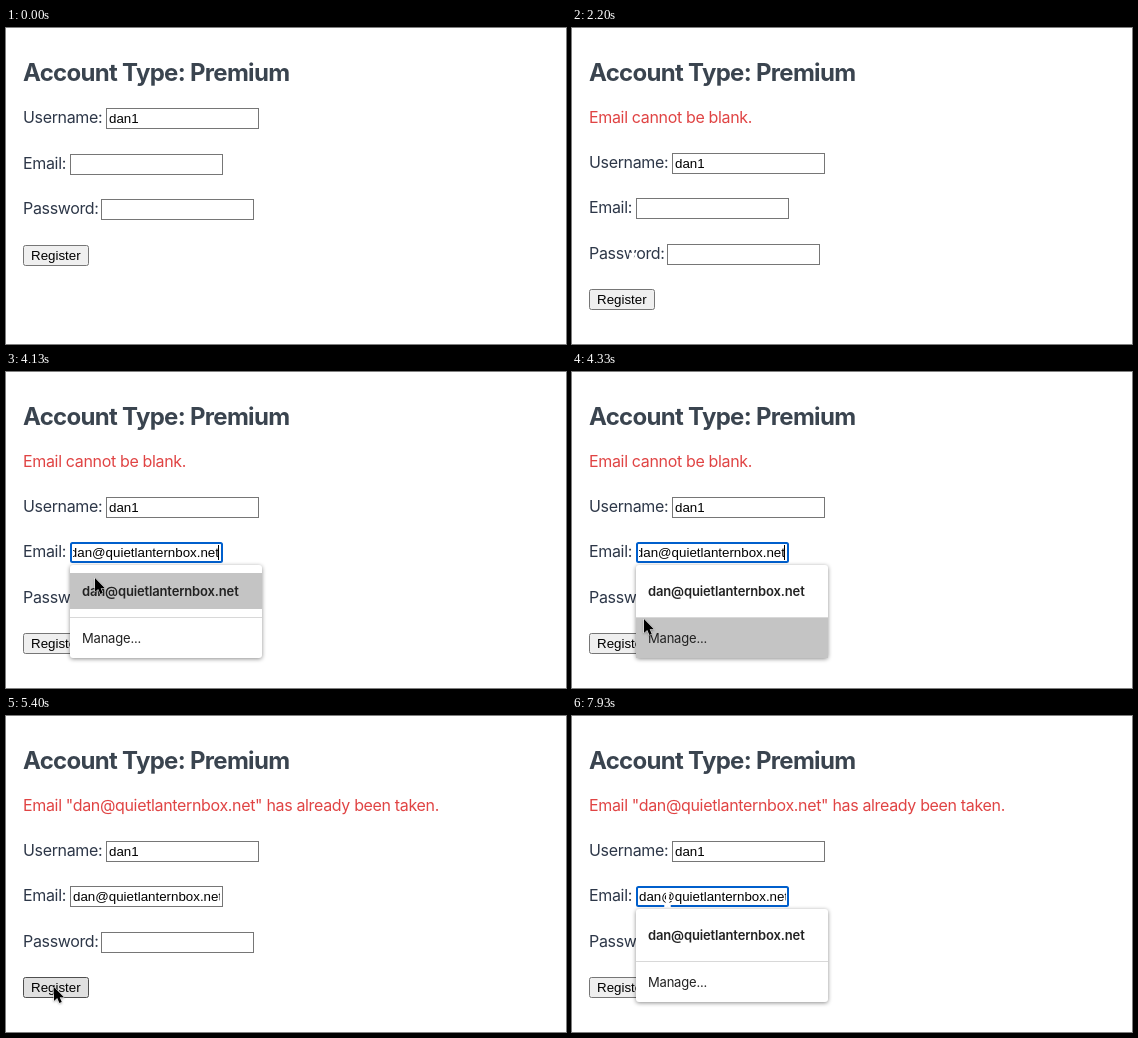
These frames come from a looping animation (560x316 px, 8 s). An HTML page:

```html
<!DOCTYPE html>
<html lang="en">
<head>
<meta charset="utf-8">
<style>
  html, body { margin: 0; width: 100%; height: 100%; overflow: hidden; background: #fff; }
  svg { display: block; }
  text { white-space: pre; }
  .copy { font: 16px Inter, sans-serif; letter-spacing: -.34px; fill: #2d3748; }
  .title { font: 700 24px Inter, sans-serif; letter-spacing: -.7px; fill: #3a444f; }
  #error { fill: #e04444; }
  .control { font: 13.333px "Liberation Sans", Arial, sans-serif; }
  .box { fill: #fff; stroke: #767676; }
  .box.hover { stroke: #4f4f4f; }
  .box.focus { stroke: #005fcc; stroke-width: 2; }
  #button { fill: #efefef; stroke: #767676; }
  #button.hover { fill: #e0e0e0; stroke: #4f4f4f; }
  #button.active { fill: #f5f5f5; stroke: #8d8d8d; }
  #popup { font: 13px Inter, sans-serif; letter-spacing: -.2px; fill: #222; }
  .item { font-weight: 600; letter-spacing: -.15px; }
  #panel { fill: #fff; filter: drop-shadow(0 1px 2px rgba(0, 0, 0, .45)); }
  #highlight { fill: #c4c4c4; }
</style>
</head>
<body>
<svg width="560" height="316" viewBox="0 0 560 316">
  <clipPath id="field"><rect x="67" y="0" width="147" height="21"/></clipPath>
  <text class="title" x="17" y="53">Account Type: Premium</text>
  <text class="copy" id="error" x="17" y="95"></text>
  <g class="row">
    <text class="copy" x="17" y="15">Username:</text>
    <rect class="box" x="100.5" y=".5" width="152" height="20"/>
    <text class="control" x="103" y="15">dan1</text>
  </g>
  <g class="row">
    <text class="copy" x="17" y="15">Email:</text>
    <rect class="box" id="emailBox" x="64.5" y=".5" width="152" height="20"/>
    <g clip-path="url(#field)"><text class="control" id="email" x="67" y="15">dan@quietlanternbox.net</text></g>
    <rect id="caret" y="3" width="1" height="15"/>
  </g>
  <g class="row">
    <text class="copy" x="17" y="15">Password:</text>
    <rect class="box" x="95.5" y=".5" width="152" height="20"/>
  </g>
  <g class="row">
    <rect id="button" x="17.5" y=".5" width="65" height="20" rx="2"/>
    <text class="control" x="25" y="15">Register</text>
  </g>
  <g id="popup">
    <rect id="panel" x="64" y="193" width="192" rx="3"/>
    <rect id="highlight" x="64" width="192"/>
    <text class="item" x="76" y="224">dan@quietlanternbox.net</text>
    <text class="item" id="second" x="76" y="260">info@quietlanternbox.net</text>
    <g id="footer">
      <rect x="64" y="245" width="192" height="1" fill="#d8d8d8"/>
      <text x="76" y="271">Manage...</text>
    </g>
  </g>
  <g id="cursor" stroke-linejoin="round">
    <path id="arrow" d="M0 0V14L3.2 11.1 5.4 16 7.8 15 5.7 10.2H10Z" stroke="#fff" paint-order="stroke"
      style="filter: drop-shadow(0 1px 1px rgba(0, 0, 0, .3))"/>
    <g id="beam" fill="none">
      <path id="beamShape" d="M-3-7.5Q0-7.5 0-5.5Q0-7.5 3-7.5M0-5.5V5.5M-3 7.5Q0 7.5 0 5.5Q0 7.5 3 7.5M-2 2.5H2" stroke="#fff" stroke-width="2.6"/>
      <use href="#beamShape" style="stroke: #000; stroke-width: 1"/>
    </g>
  </g>
</svg>
<script>
const $ = id => document.getElementById(id);
const rows = [...document.querySelectorAll('.row')];
const boxes = [...document.querySelectorAll('.box')];
const LOOP = 8000, STEP = 200 / 3;
const TOPS = [80, 126, 171, 217], SHIFTED = [125, 170, 216, 261];
const FIELD_X = [100, 64, 95];

// pointer path: time, x, y
const PATH = [
  [730, 304, 90], [870, 150, 185], [1000, 45, 248], [1070, 16, 261], [1130, 17, 257], [1330, 60, 233],
  [2333, 60, 233], [2600, 101, 171], [2800, 101, 178],
  [4000, 101, 178], [4333, 72, 247], [4600, 48, 271],
  [5800, 48, 271], [6130, 76, 214], [6400, 96, 183],
  [7733, 96, 183], [7800, 97, 181], [7930, 95, 182]
];

const show = (el, on) => el.style.display = on ? '' : 'none';
const within = (t, ...spans) => spans.some(([a, b]) => t >= a && t < b);

function pointer(t) {
  const next = PATH.findIndex(p => p[0] > t);
  if (next < 0) return PATH.at(-1).slice(1);
  if (!next) return PATH[0].slice(1);
  const [a, b] = [PATH[next - 1], PATH[next]];
  const k = (t - a[0]) / (b[0] - a[0]);
  return [1, 2].map(i => Math.round(a[i] + (b[i] - a[i]) * k));
}

function draw(t) {
  const [x, y] = pointer(Math.floor((t + 5) / STEP) * STEP);
  const visible = t >= 730 && !within(t, [3800, 4070]);
  const tops = t < 2200 ? TOPS : SHIFTED;
  const focus = within(t, [3270, 4800], [6870, LOOP]);
  const open = within(t, [3270, 4800], [7000, LOOP]);
  const extra = within(t, [3270, 3870]) ? 36 : 0;
  const bottom = 286 + extra;
  const inPopup = open && visible && x >= 64 && x < 256 && y >= 193 && y < bottom;
  const over = visible && !inPopup ? tops.findIndex(top => y >= top && y < top + 21) : -1;

  rows.forEach((row, i) => row.setAttribute('transform', `translate(0 ${tops[i]})`));
  boxes.forEach((box, i) => {
    const hover = over === i && x >= FIELD_X[i] && x < FIELD_X[i] + 153;
    box.classList.toggle('hover', hover);
  });

  const inset = focus ? 1 : .5;
  const size = { x: 64 + inset, y: inset, width: 153 - 2 * inset, height: 21 - 2 * inset, rx: focus ? 1.5 : 0 };
  for (const key in size) $('emailBox').setAttribute(key, size[key]);
  $('emailBox').classList.toggle('focus', focus);

  $('error').textContent = t < 2200 ? '' : t < 5400 ? 'Email cannot be blank.'
    : 'Email "dan@quietlanternbox.net" has already been taken.';

  // while editing, the field is scrolled to the end of its text
  const scrolled = within(t, [3800, 4800]);
  show($('email'), t >= 3800);
  $('email').setAttribute('x', scrolled ? 213 : 67);
  $('email').setAttribute('text-anchor', scrolled ? 'end' : 'start');
  show($('caret'), within(t, [3270, 4400], [6870, 7530]));
  $('caret').setAttribute('x', t < 3800 ? 68 : scrolled ? 212 : 90);

  const active = within(t, [1600, 1800], [4930, 5000]);
  const onButton = over === 3 && x >= 17 && x < 83;
  $('button').setAttribute('class', active ? 'active' : onButton ? 'hover' : '');

  show($('popup'), open);
  $('panel').setAttribute('height', bottom - 193);
  show($('second'), extra);
  $('footer').setAttribute('transform', `translate(0 ${extra})`);
  const onFooter = y >= 246 + extra;
  show($('highlight'), inPopup && (onFooter || (y >= 201 && y < 237)));
  $('highlight').setAttribute('y', onFooter ? 246 + extra : 201);
  $('highlight').setAttribute('height', onFooter ? 40 : 36);

  const onText = over >= 0 && over < 3 && x >= 17 && x < FIELD_X[over] + 153;
  show($('cursor'), visible);
  show($('arrow'), !onText);
  show($('beam'), onText);
  const half = onText ? .5 : 0;
  $('cursor').setAttribute('transform', `translate(${x + half} ${y + half})`);
}

const start = performance.now();
function frame() {
  draw((performance.now() - start) % LOOP);
  requestAnimationFrame(frame);
}
frame();
</script>
</body>
</html>
```
